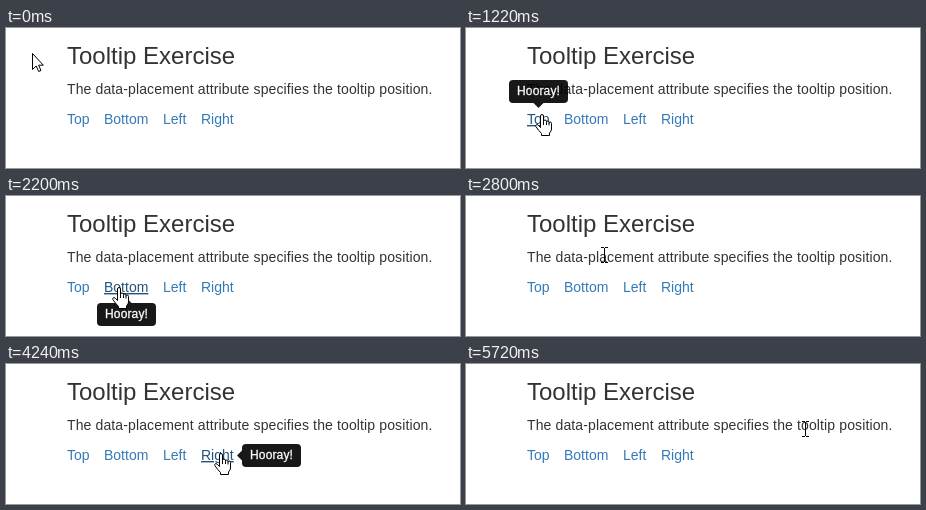
Write an HTML page that moves like this. It is 454x140 px and loops after 5.87 s.

```html
<!DOCTYPE html>
<html lang="en">
<head>
<meta charset="utf-8">
<title>Tooltip Exercise</title>
<style>
  html, body { margin: 0; width: 100%; height: 100%; overflow: hidden; background: #fff; }
  svg { display: block; width: 454px; height: 140px; font: 14px "Liberation Sans", Arial, sans-serif; }
  .copy { fill: #333; }
  .link { fill: #337ab7; }
  .link.hover { fill: #23527c; text-decoration: underline; }
  .tip text { font-size: 12px; letter-spacing: .15px; fill: #fff; stroke: #fff; stroke-width: .3px; }
  .cursor { fill: #fff; stroke: #000; stroke-linejoin: round; }
</style>
</head>
<body>
<svg viewBox="0 0 454 140">
  <rect width="454" height="140" fill="#fff"/>
  <text class="copy" x="61" y="36" font-size="24">Tooltip Exercise</text>
  <text class="copy" x="61" y="66" letter-spacing=".125">The data-placement attribute specifies the tooltip position.</text>
  <g id="links"></g>
  <g id="tips"></g>
  <path id="arrow" class="cursor" d="M.5.5V16.5L4.2 13 6.7 18.5 9 17.5 6.6 12.2H11.3Z"/>
  <g id="hand" class="cursor">
    <path d="M5.5 13.5V2Q5.5.5 7 .5T8.5 2V7.5Q8.5 6 10 6T11.5 7.5V8.5Q11.5 7 12.8 7T14 8.5V9.5Q14 8 15.2 8T16.5 9.5V15Q16.5 17 14.5 19V21.5H6.5V19.5Q4 17 .8 12.5Q.3 11 1.8 10.5Q3 10.5 5.5 13.5Z"/>
    <path d="M8.5 7.5V11M11.5 8.5V11M14 9.5V11.5" fill="none"/>
  </g>
  <path id="beam" d="M-3.5-7.5h3m1 0h3M-3.5 7.5h3m1 0h3M0-7V7" fill="none" stroke="#000"/>
</svg>
<script>
const LOOP = 5870, FADE = 130;
const $ = id => document.getElementById(id);

// Bursts of visible updates: first time, last time, count
const bursts = [
  [420, 980, 8], [1060, 1220, 3], [1790, 2200, 6], [2650, 3190, 8],
  [3250, 3320, 2], [3920, 4240, 5], [4940, 5480, 8], [5560, 5560, 1], [5720, 5720, 1]
];

const linear = p => p;
const easeIn = p => p * p;
const easeOut = p => p * (2 - p);
const smooth = p => p * p * (3 - 2 * p);

// Pointer keys: time, x, y, easing towards the key
const keys = [
  [340, 26, 25], [980, 60, 82, smooth], [1220, 75, 86, easeOut],
  [1710, 75, 86], [1950, 107, 90, easeIn], [2200, 112, 91, easeOut],
  [2570, 112, 91], [2800, 138, 59], [2960, 152, 57, easeOut],
  [3190, 163, 79], [3320, 167, 89], [3840, 167, 89], [4240, 214, 89],
  [4860, 214, 89], [5480, 336, 65, smooth], [5560, 337, 65], [5720, 339, 65]
];

// Each link with its tooltip box, arrow and fade times
const items = [
  { label: "Top", x: 61, end: 84, box: [43, 52], tail: "M67.5 75h10l-5 5z", show: 1050, hide: 1885 },
  { label: "Bottom", x: 98, end: 143, box: [91, 107], tail: "M115.5 107h10l-5-5z", show: 1937, hide: 2640 },
  { label: "Left", x: 157, end: 181, box: [90, 80], tail: "M149 86.5v10l5-5z", show: 3190, hide: 3990 },
  { label: "Right", x: 195, end: 228, box: [236, 80], tail: "M236 86.5v10l-5-5z", show: 4100, hide: 4990 }
];

function add(parent, tag, attrs, text = "") {
  const el = document.createElementNS("http://www.w3.org/2000/svg", tag);
  for (const name in attrs) el.setAttribute(name, attrs[name]);
  el.textContent = text;
  return parent.appendChild(el);
}

for (const item of items) {
  const [x, y] = item.box;
  item.link = add($("links"), "text", { class: "link", x: item.x, y: 96 }, item.label);
  item.tip = add($("tips"), "g", { class: "tip" });
  add(item.tip, "rect", { x, y, width: 59, height: 23, rx: 4 });
  add(item.tip, "path", { d: item.tail });
  add(item.tip, "text", { x: x + 8, y: y + 15 }, "Hooray!");
}

const clamp = v => Math.max(0, Math.min(1, v));

function snap(t) {
  let last = 0;
  for (const [from, to, count] of bursts) {
    for (let i = 0; i < count; i++) {
      const step = count > 1 ? (to - from) / (count - 1) : 0;
      const at = Math.round((from + i * step) / 10) * 10;
      if (at <= t) last = at;
    }
  }
  return last;
}

function pointer(t) {
  const next = keys.findIndex(key => key[0] > t);
  if (next === 0) return keys[0].slice(1, 3);
  if (next < 0) return keys[keys.length - 1].slice(1, 3);
  const [t0, x0, y0] = keys[next - 1];
  const [t1, x1, y1, ease = linear] = keys[next];
  const p = ease((t - t0) / (t1 - t0));
  return [x0 + (x1 - x0) * p, y0 + (y1 - y0) * p].map(Math.round);
}

function place(id, active, x, y) {
  $(id).setAttribute("display", active ? "inline" : "none");
  $(id).setAttribute("transform", `translate(${x} ${y})`);
}

function draw(time) {
  const t = snap(time);
  const [x, y] = pointer(t);
  let onLink = false;
  for (const item of items) {
    const hover = y >= 83 && y <= 100 && x >= item.x && x <= item.end;
    onLink = onLink || hover;
    item.link.classList.toggle("hover", hover);
    const alpha = clamp((t - item.show) / FADE) - clamp((t - item.hide) / FADE);
    item.tip.setAttribute("opacity", .9 * alpha);
  }
  const onText = x >= 61 && x <= 427 && y >= 52 && y <= 70;
  place("hand", onLink, x - 6, y);
  place("beam", onText, x + .5, y);
  place("arrow", !onLink && !onText, x, y);
}

const start = performance.now();
function tick() {
  draw((performance.now() - start) % LOOP);
  requestAnimationFrame(tick);
}
tick();
</script>
</body>
</html>
```
